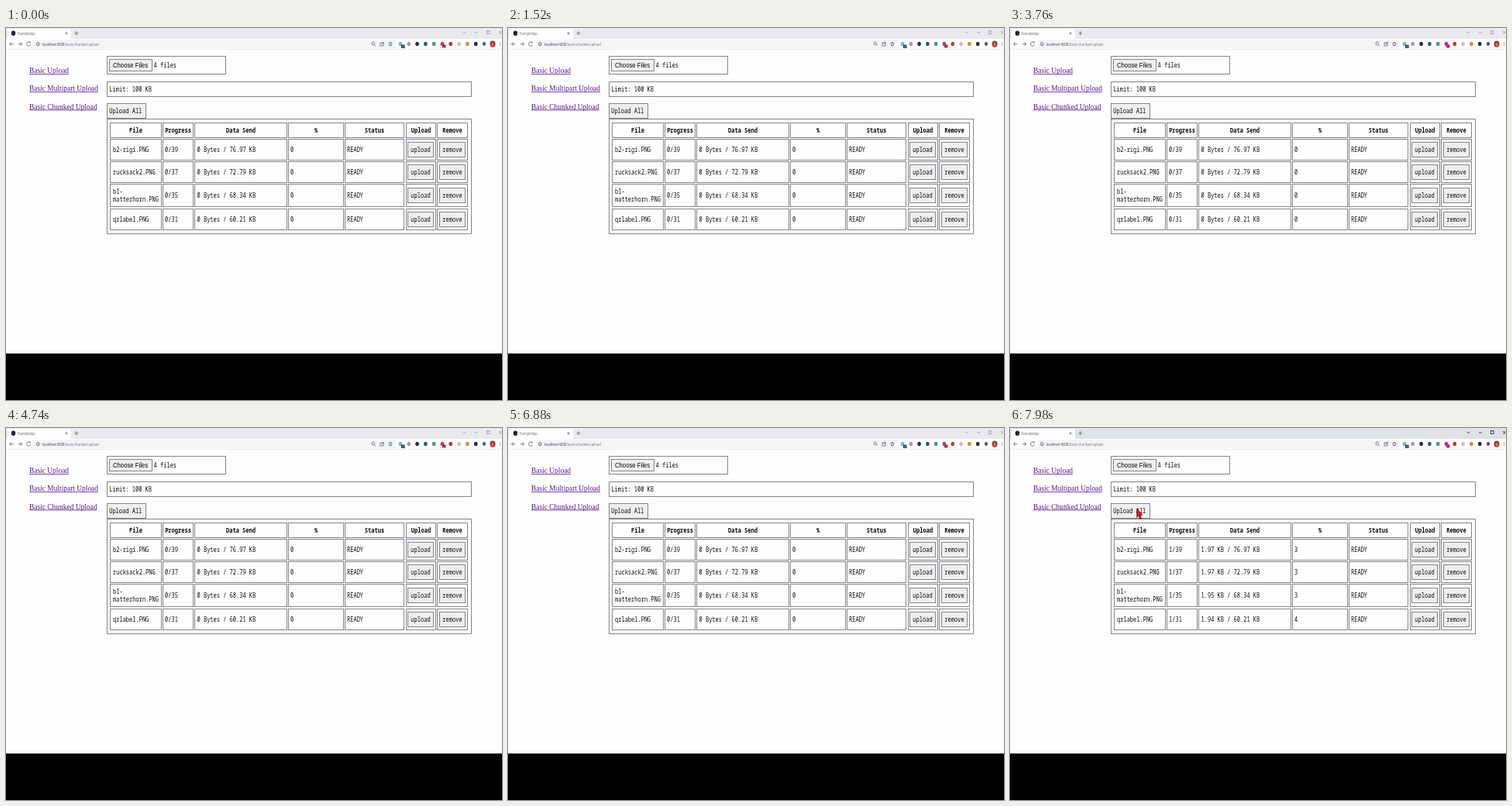
An HTML page with a canvas for the animation above (8 s loop, 640x480 px).

```html
<!DOCTYPE html>
<html lang="en">
<head>
<meta charset="utf-8">
<title>Chunked upload</title>
<style>
html, body { margin: 0; width: 100%; height: 100%; overflow: hidden; background: #000; }
canvas { display: block; width: 640px; height: 480px; }
</style>
</head>
<body>
<canvas id="stage" width="640" height="480"></canvas>
<script>
const ctx = document.getElementById('stage').getContext('2d');
const LOOP = 8000;
const CURSOR_IN = 6980, CURSOR_REST = 7340, CLICK = 7400, FIRST_CHUNK = 7780;
const SQUEEZE = 0.857;

const PAGE = '#fefefe', BUTTON = '#efefef', LINE = '#84848c';
const INK = '#0a0a0a', ICON = '#63666a', LINK = '#551a8b';
const MONO = '8.2px "Noto Sans Mono", monospace';
const SERIF = '11px "Liberation Serif", serif';
const SANS = '9px "Liberation Sans", sans-serif';
const TINY = '4.9px "Open Sans", sans-serif';

const columns = [
  ['File', 134, 201], ['Progress', 202, 242], ['Data Send', 243, 363],
  ['%', 364, 436], ['Status', 437, 514], ['Upload', 516, 555], ['Remove', 556, 596]
];
const files = [
  { name: ['b2-rigi.PNG'], chunks: 39, size: '76.97', sent: '1.97', pct: 3, top: 143, bottom: 171 },
  { name: ['rucksack2.PNG'], chunks: 37, size: '72.79', sent: '1.97', pct: 3, top: 172, bottom: 200 },
  { name: ['b1-', 'matterhorn.PNG'], chunks: 35, size: '68.34', sent: '1.95', pct: 3, top: 201, bottom: 231 },
  { name: ['qrlabel.PNG'], chunks: 31, size: '60.21', sent: '1.94', pct: 4, top: 233, bottom: 261 }
];

function fill(x, y, w, h, color) {
  ctx.fillStyle = color;
  ctx.fillRect(x, y, w, h);
}

function box(l, t, r, b, color) {
  if (color) fill(l, t, r - l, b - t, color);
  ctx.strokeStyle = LINE;
  ctx.lineWidth = 1;
  ctx.strokeRect(l + 0.5, t + 0.5, r - l - 1, b - t - 1);
}

function text(str, x, y, font = MONO, color = INK, align = 'left') {
  ctx.save();
  ctx.translate(x, y);
  ctx.scale(SQUEEZE, 1);
  ctx.font = font;
  ctx.fillStyle = color;
  ctx.textAlign = align;
  ctx.fillText(str, 0, 0);
  const width = ctx.measureText(str).width * SQUEEZE;
  ctx.restore();
  return width;
}

function dot(x, y, r, color) {
  ctx.fillStyle = color;
  ctx.beginPath();
  ctx.ellipse(x, y, r * SQUEEZE, r, 0, 0, Math.PI * 2);
  ctx.fill();
}

function ring(x, y, r, from = 0, to = Math.PI * 2) {
  ctx.beginPath();
  ctx.ellipse(x, y, r * SQUEEZE, r, 0, from, to);
  ctx.stroke();
}

function path(...p) {
  ctx.beginPath();
  for (let i = 0; i < p.length; i += 2) ctx.lineTo(p[i], p[i + 1]);
  ctx.stroke();
}

function drawTabs(focused) {
  fill(0, 0, 640, 14, focused ? '#dee1e6' : '#e8eaed');
  fill(2, 1, 82, 13, PAGE);
  dot(9.5, 6.8, 3.2, '#24242a');
  text('ExampleApp', 15, 8.6, '4.5px "Open Sans", sans-serif', ICON);

  ctx.strokeStyle = ICON;
  ctx.lineWidth = 0.8;
  path(76.5, 5.2, 79.3, 8.4);
  path(79.3, 5.2, 76.5, 8.4);
  path(88.5, 6.8, 93.2, 6.8);
  path(90.8, 4.2, 90.8, 9.4);

  ctx.strokeStyle = focused ? '#1c1c20' : '#97999e';
  path(589.7, 4.8, 591.5, 6.8, 593.3, 4.8);
  path(605, 6, 609, 6);
  ctx.strokeRect(620.5, 3.5, 3.5, 4);
  path(636, 3.8, 639.4, 7.6);
  path(639.4, 3.8, 636, 7.6);
}

function drawToolbar() {
  ctx.strokeStyle = ICON;
  fill(36, 15.5, 467, 10.5, '#f3f4f6');
  path(9.5, 20.7, 4.8, 20.7);
  path(6.8, 18.3, 4.8, 20.7, 6.8, 23.1);
  path(15.8, 20.7, 20.5, 20.7);
  path(18.5, 18.3, 20.5, 20.7, 18.5, 23.1);
  ring(29, 20.7, 2.7, 0.2, 5.4);
  path(29.5, 18.5, 31.3, 18.9, 31.3, 17);
  ring(41.3, 20.7, 2.3);
  path(41.3, 20.2, 41.3, 22);
  const w = text('localhost:4200', 47, 22.6, TINY, '#333338');
  text('/basic-chunked-upload', 47 + w, 22.6, TINY, '#74767a');

  ring(473.7, 20, 2);
  path(475.2, 21.6, 477, 23.5);
  ctx.strokeRect(483, 19, 4, 4);
  path(485, 21, 487.5, 17.7);
  ctx.beginPath();
  for (let i = 0; i < 10; i++) {
    const r = i % 2 ? 1.3 : 2.9, a = -Math.PI / 2 + i * Math.PI / 5;
    ctx.lineTo(496 + Math.cos(a) * r * SQUEEZE, 20.7 + Math.sin(a) * r);
  }
  ctx.closePath();
  ctx.stroke();

  const extensions = ['#8cb0d8', '#a0a0a4', '#303038', '#385868', '#38a070', '#c03858',
    '#d03038', '#d0c0b4', '#e08830', '#303038'];
  extensions.forEach((color, i) => dot(509 + i * 10.8, 20.5, 2.7, color));
  fill(510, 21.5, 4.5, 4.5, '#30307c');
  text('2', 511.2, 25.4, '4.5px "Open Sans", sans-serif', '#fff');
  fill(563, 21.5, 4.5, 4, '#b82858');
  dot(617, 20.5, 2.4, '#55565a');
  dot(628, 20.7, 4.1, '#b83420');
  text('A', 628, 22.5, TINY, '#fff', 'center');
  for (let i = 0; i < 3; i++) dot(637.8, 18.6 + i * 2.1, 0.65, ICON);
  fill(0, 27, 640, 1, '#ebecef');
}

function drawLink(str, y) {
  const w = text(str, 30, y, SERIF, LINK);
  fill(30, y + 1, w, 0.8, LINK);
}

function drawForm() {
  drawLink('Basic Upload', 58);
  drawLink('Basic Multipart Upload', 81);
  drawLink('Basic Chunked Upload', 104.5);
  box(130, 36, 284, 60);
  box(133, 40, 189, 56, BUTTON);
  text('Choose Files', 138, 51.2, SANS);
  text('4 files', 190.6, 51);
  box(130, 69, 601, 89);
  text('Limit: 100 KB', 133.3, 82);
  box(130, 97, 181, 117, BUTTON);
  text('Upload All', 133.2, 110.3);
}

function drawTable(sending) {
  box(130, 117, 601, 266);
  for (const [title, l, r] of columns) {
    box(l, 122, r, 142);
    text(title, (l + r) / 2, 135.3, 'bold ' + MONO, INK, 'center');
  }
  for (const f of files) {
    const mid = (f.top + f.bottom) / 2, base = mid + 3;
    for (const [, l, r] of columns) box(l, f.top, r, f.bottom);
    f.name.forEach((part, i) =>
      text(part, 138, base + (i - (f.name.length - 1) / 2) * 10.8));
    text(`${sending ? 1 : 0}/${f.chunks}`, 205, base);
    text(`${sending ? f.sent + ' KB' : '0 Bytes'} / ${f.size} KB`, 246.5, base);
    text(String(sending ? f.pct : 0), 367, base);
    text('READY', 440, base);
    for (const [label, l, r] of [['upload', 518, 552], ['remove', 559, 593]]) {
      box(l, Math.round(mid - 10), r, Math.round(mid + 10), BUTTON);
      text(label, (l + r) / 2, base, MONO, INK, 'center');
    }
  }
}

// The pointer comes in over the right edge and slows down on the button.
function drawCursor(t) {
  if (t < CURSOR_IN) return;
  const p = Math.min(1, (t - CURSOR_IN) / (CURSOR_REST - CURSOR_IN));
  const away = (1 - p) ** 3;
  ctx.save();
  ctx.translate(163.7 + 476 * away, 104.3 + 150 * away);
  ctx.beginPath();
  for (const [x, y] of [[0, 0], [0, 11], [2.4, 8.8], [4, 13], [5.8, 12.2], [4.3, 8.3], [7.2, 8]])
    ctx.lineTo(x, y);
  ctx.closePath();
  ctx.fillStyle = '#e01818';
  ctx.fill();
  ctx.strokeStyle = '#641010';
  ctx.lineWidth = 0.8;
  ctx.stroke();
  ctx.restore();
}

function draw(t) {
  fill(0, 0, 640, 420, PAGE);
  fill(0, 420, 640, 60, '#000');
  drawTabs(t >= CLICK);
  drawToolbar();
  drawForm();
  drawTable(t >= FIRST_CHUNK);
  drawCursor(t);
}

const start = performance.now();
function frame() {
  draw((performance.now() - start) % LOOP);
  requestAnimationFrame(frame);
}
frame();
</script>
</body>
</html>
```
